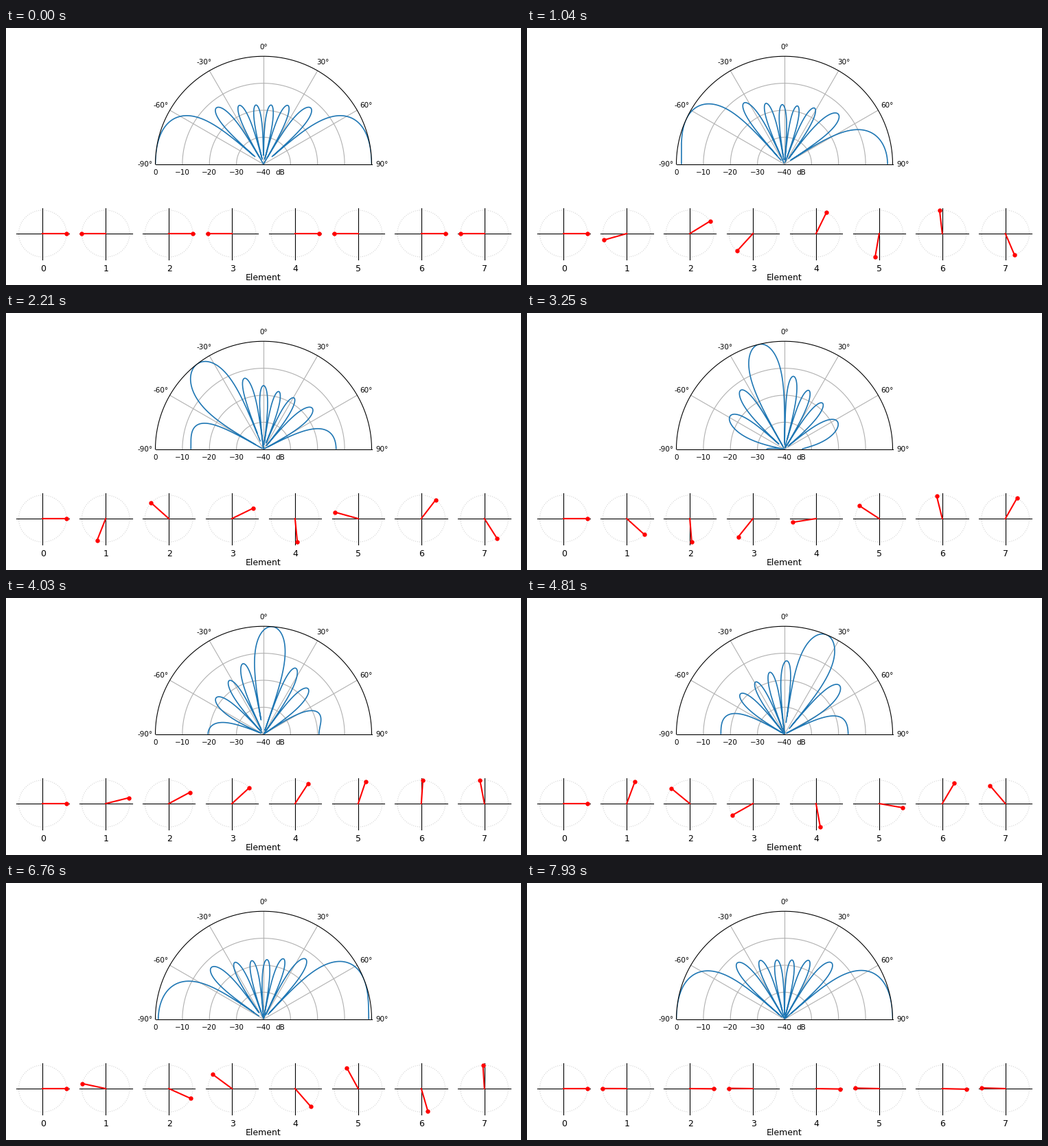
A matplotlib script that plays this animation: 750x375 px, repeating every 8 s.

```python
import numpy as np
import matplotlib.pyplot as plt
from matplotlib.animation import FuncAnimation
from matplotlib.patches import Wedge

WIDTH, HEIGHT, DPI = 750, 375, 100
LOOP_MS, TICK_MS, STEP_MS = 8000, 20, 130
STEERING = np.radians(np.linspace(-90, 90, 60))
THETA = np.radians(np.linspace(-90, 90, 1001))
ELEMENTS = np.arange(8)

# Polar plot and element dials, in pixels from the top left
POLAR_X, POLAR_Y, POLAR_R = 375, 198.75, 157.5
FLOOR_DB = -40
DIAL_W, DIAL_H = 720 / 9.4, 75
DIAL_X = 15 + DIAL_W * (0.5 + 1.2 * ELEMENTS)
DIAL_Y = 300
RADIUS_X, RADIUS_Y = DIAL_W / 2.2, DIAL_H / 2.2

plt.rcParams["font.family"] = "DejaVu Sans"
fig = plt.figure(figsize=(WIDTH / DPI, HEIGHT / DPI), dpi=DPI, facecolor="white")
ax = fig.add_axes([0, 0, 1, 1])
ax.set_xlim(0, WIDTH)
ax.set_ylim(HEIGHT, 0)
ax.axis("off")


def stroke(x, y, color, width=0.8, **style):
    return ax.plot(x, y, color=color, lw=width, **style)[0]


def label(x, y, text, size=7.5):
    """Centre the text's capital height on y."""
    half_cap = 0.365 * size * DPI / 72
    ax.text(x, y + half_cap, text, size=size, ha="center", va="baseline")


def polar(theta, radius):
    """Angles run clockwise from straight up."""
    return POLAR_X + radius * np.sin(theta), POLAR_Y - radius * np.cos(theta)


def pattern_db(steering):
    shift = np.pi * (np.sin(THETA) - np.sin(steering))
    total = np.exp(1j * np.outer(ELEMENTS, shift)).sum(axis=0)
    return 20 * np.log10(np.abs(total) / len(ELEMENTS) + 1e-12)


def draw_polar_grid():
    for part in (0.25, 0.5, 0.75):
        stroke(*polar(THETA, part * POLAR_R), "#b0b0b0", zorder=1)
    for degrees in (-60, -30, 0, 30, 60):
        stroke(*polar(np.radians(degrees), np.array([0, POLAR_R])), "#b0b0b0", zorder=1)
    stroke(*polar(THETA, POLAR_R), "black", zorder=2.5)
    stroke([POLAR_X - POLAR_R, POLAR_X + POLAR_R], [POLAR_Y, POLAR_Y], "black", zorder=2.5)

    label(375, 27, "0°")
    for degrees, left, right, y in ((30, 289, 461.5, 49.5),
                                    (60, 225.5, 524.5, 112.5),
                                    (90, 202.5, 548, 198.5)):
        label(left, y, f"-{degrees}°")
        label(right, y, f"{degrees}°")
    for k in range(5):
        text = f"\N{MINUS SIGN}{10 * k}" if k else "0"
        label(POLAR_X - POLAR_R * (1 - k / 4), 210.5, text)
    label(399.5, 210.5, "dB")


def draw_dials():
    turn = np.linspace(0, 2 * np.pi, 200)
    for n, x in zip(ELEMENTS, DIAL_X):
        stroke(x + RADIUS_X * np.cos(turn), DIAL_Y + RADIUS_Y * np.sin(turn),
               "lightgray", linestyle=":", zorder=1)
        stroke([x - DIAL_W / 2, x + DIAL_W / 2], [DIAL_Y, DIAL_Y], "black", zorder=1.5)
        stroke([x, x], [DIAL_Y - DIAL_H / 2, DIAL_Y + DIAL_H / 2], "black", zorder=1.5)
        label(x + 0.6, 350.4, str(n), 9)
    label(374.5, 363.4, "Element", 9)


draw_polar_grid()
draw_dials()
beam = stroke([], [], "#1f77b4", 1.2, zorder=2)
beam.set_clip_path(Wedge((POLAR_X, POLAR_Y), POLAR_R, 180, 360, transform=ax.transData))
arms = stroke([], [], "red", 1.5, zorder=3)
tips = stroke([], [], "red", 0, marker="o", markersize=3.6, zorder=3)


def update(tick):
    # Sweep forward, hold the end for a second step, then turn back
    step = (tick * TICK_MS + TICK_MS // 2) // STEP_MS
    last = len(STEERING) - 1
    steering = STEERING[step if step <= last else 2 * last + 1 - step]

    radius = POLAR_R * (1 - pattern_db(steering) / FLOOR_DB)
    beam.set_data(*polar(THETA, np.where(radius >= 0, radius, np.nan)))

    phase = ELEMENTS * np.pi * np.sin(steering)
    tip_x = DIAL_X + RADIUS_X * np.cos(phase)
    tip_y = DIAL_Y - RADIUS_Y * np.sin(phase)
    gap = np.full(len(ELEMENTS), np.nan)
    hub_y = np.full(len(ELEMENTS), DIAL_Y)
    arms.set_data(np.column_stack([DIAL_X, tip_x, gap]).ravel(),
                  np.column_stack([hub_y, tip_y, gap]).ravel())
    tips.set_data(tip_x, tip_y)
    return beam, arms, tips


animation = FuncAnimation(fig, update, frames=LOOP_MS // TICK_MS, interval=TICK_MS,
                          repeat=True, repeat_delay=0)
plt.show()
```
